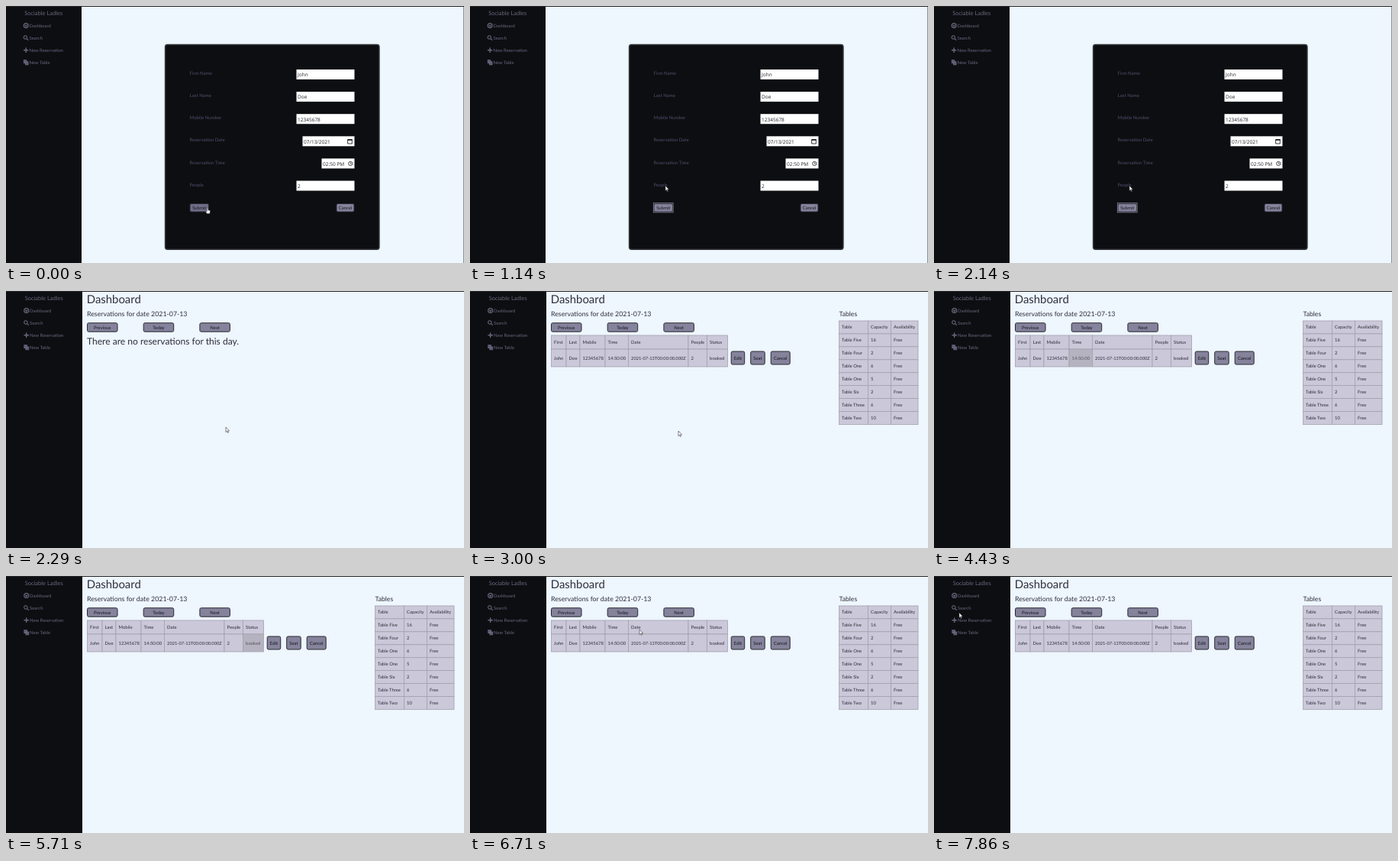
Recreate the animation shown at these times as an HTML page with a canvas. Size 600 by 336 pixels, loop 8000 ms.

```html
<!DOCTYPE html>
<html lang="en">
<head>
<meta charset="utf-8">
<title>Reservations</title>
<style>
  html, body { margin: 0; width: 100%; height: 100%; overflow: hidden; background: #eef6fe; }
  canvas { display: block; }
</style>
</head>
<body>
<canvas id="stage" width="600" height="336"></canvas>
<script>
const ctx = document.getElementById('stage').getContext('2d');
const LOOP = 8000, FORM_END = 2290, DATA_READY = 2430, FOCUS_AT = 1140;
const INK = '#2f2f3a', DARK = '#0d0e11', MUTED = '#68667f', LABEL = '#504e6b';
const BUTTON = '#85829c', BUTTON_HOVER = '#706d88';
const CELL = '#cbc8d9', CELL_HOVER = '#b5b3bf', LINE = '#a3a1ad';

// Pointer stops: time, x, y
const pointerStops = [
  [0, 264, 264], [140, 261, 252], [290, 258, 241], [430, 256, 235],
  [2290, 288, 178], [2570, 285, 180], [2710, 281, 181], [2860, 276, 183], [3000, 273, 183],
  [3290, 240, 132], [3430, 112, 55], [3570, 31, 39], [3710, 38, 42],
  [3860, 124, 47], [4000, 272, 47], [4140, 238, 47], [4290, 204, 47],
  [4430, 195, 87], [4860, 245, 88], [5140, 282, 88], [5290, 298, 88],
  [5710, 325, 88], [5860, 334, 88], [6000, 340, 88], [6140, 351, 87],
  [6430, 357, 88], [6570, 300, 82], [6710, 222, 70], [6860, 174, 55],
  [7570, 118, 54], [7710, 66, 52], [7860, 33, 48]
];
const links = ['Dashboard', 'Search', 'New Reservation', 'New Table'];
const fields = [
  ['First Name', 'John', 380.5], ['Last Name', 'Doe', 380.5],
  ['Mobile Number', '12345678', 380.5], ['Reservation Date', '07/13/2021', 388.5],
  ['Reservation Time', '02:50 PM', 413.5], ['People', '2', 380.5]
];
const bookingColumns = [106.5, 126, 144, 177, 207.5, 286, 310.5, 337.5];
const bookingHead = ['First', 'Last', 'Mobile', 'Time', 'Date', 'People', 'Status'];
const booking = ['John', 'Doe', '12345678', '14:50:00', '2021-07-13T00:00:00.000Z', '2', 'booked'];
const seatColumns = [483.5, 521.5, 551.5, 587];
const seats = [['Table', 'Capacity', 'Availability'],
  ...[['Five', 16], ['Four', 2], ['One', 6], ['One', 5], ['Six', 2], ['Three', 6], ['Two', 10]]
    .map(([name, size]) => ['Table ' + name, size, 'Free'])];

let pointer;

function text(str, x, y, size, color = INK, align = 'left', family = 'Lato') {
  ctx.font = `${size}px ${family}, sans-serif`;
  ctx.textAlign = align;
  ctx.fillStyle = color;
  ctx.fillText(str, x, y);
}

function rect(x, y, w, h, fill) {
  ctx.fillStyle = fill;
  ctx.fillRect(x, y, w, h);
}

function panel(x, y, w, h, radius, fill, stroke, lineWidth = 1) {
  ctx.beginPath();
  ctx.roundRect(x, y, w, h, radius);
  ctx.fillStyle = fill;
  ctx.fill();
  ctx.strokeStyle = stroke;
  ctx.lineWidth = lineWidth;
  ctx.stroke();
}

function path(d, stroke, lineWidth, fill) {
  const shape = new Path2D(d);
  if (fill) { ctx.fillStyle = fill; ctx.fill(shape); }
  ctx.strokeStyle = stroke;
  ctx.lineWidth = lineWidth;
  ctx.stroke(shape);
}

function at(x, y, draw) {
  ctx.save();
  ctx.translate(x, y);
  draw();
  ctx.restore();
}

function over(x, y, w, h) {
  const hit = pointer.x >= x && pointer.x < x + w && pointer.y >= y && pointer.y < y + h;
  return hit;
}

function button(label, x, y, w, h) {
  const hovered = over(x, y, w, h);
  if (hovered) pointer.shape = 'hand';
  panel(x + .5, y + .5, w - 1, h - 1, 1.8, hovered ? BUTTON_HOVER : BUTTON, '#292833');
  text(label, x + w / 2, y + h / 2 + 2.1, 5.95, '#17171f', 'center');
}

function cell(str, x, y, w, h, hoverable) {
  const hovered = hoverable && over(x, y, w, h);
  if (hovered) pointer.shape = 'none';
  rect(x, y, w, h, hovered ? CELL_HOVER : CELL);
  ctx.strokeStyle = LINE;
  ctx.lineWidth = .8;
  ctx.strokeRect(x, y, w, h);
  const size = String(str).length > 20 ? 5.72 : 5.9;
  text(str, x + 3.6, y + h / 2 + 2, size, hovered ? '#56555f' : INK);
}

function tableRow(values, columns, y, h, hoverable) {
  values.forEach((v, i) => cell(v, columns[i], y, columns[i + 1] - columns[i], h, hoverable));
}

function sidebar(width) {
  const shift = width - 100;
  rect(0, 0, width, 336, DARK);
  text('Sociable Ladles', 49.7 + shift / 2, 12, 7.5, MUTED, 'center');
  links.forEach((label, i) => {
    const y = 28 + i * 16.1;
    text(label, 31 + shift / 2, y, 5.95, MUTED);
    if (over(23, y - 7, 53, 10)) pointer.shape = 'hand';
  });
  const icons = [
    'M-3 0A3 3 0 1 1 3 0A3 3 0 1 1 -3 0M-1.5 -1L0 1.2L1.5 -1',
    'M-3 -.7A2.2 2.2 0 1 1 1.4 -.7A2.2 2.2 0 1 1 -3 -.7M.9 .9L3.2 3.2',
    'M-3.2 0H3.2M0 -3.2V3.2',
    'M-2.8 -3H.6V.5H-2.8ZM-.7 -.8H2.8V2.8H-.7Z'
  ];
  icons.forEach((d, i) => at(26.7 + shift / 2, 25.6 + i * 16.1,
    () => path(d, MUTED, i === 2 ? 1.5 : 1.1, i === 3 && '#55536b')));
}

function formPage(t) {
  sidebar(99);
  rect(599, 0, 1, 336, '#8b9096');
  panel(208.5, 50.5, 280.5, 267.7, 3, DARK, '#393a40', 1.4);
  fields.forEach(([label, value, x], i) => {
    const y = 83 + i * 29.1;
    text(label, 240.6, y + 7.1, 6.1, LABEL);
    rect(x, y, 456.5 - x, 13, '#fff');
    text(value, x + 1.6, y + 9.3, 6.5, '#24242a', 'left', '"Open Sans"');
  });
  at(450.5, 177, () => {
    path('M-2.8 -2.4H2.8V3H-2.8Z', '#222', .9);
    rect(-3, -3, 6, 1.8, '#222');
  });
  at(451.3, 206, () => path('M-2.7 0A2.7 2.7 0 1 1 2.7 0A2.7 2.7 0 1 1 -2.7 0M0 -1.7V.2H1.4', '#222', .8));
  button('Submit', 240.5, 258, 25.5, 11.5);
  button('Cancel', 432.5, 258, 24, 11.5);
  if (t >= FOCUS_AT) {
    ctx.strokeStyle = '#77758b';
    ctx.lineWidth = 1;
    ctx.strokeRect(240.4, 257.6, 25.7, 12.2);
  }
}

function dashboardPage(t) {
  sidebar(100);
  text('Dashboard', 105.8, 16.3, 14.9);
  text('Reservations for date 2021-07-13', 106, 32.5, 8.8);
  ['Previous', 'Today', 'Next'].forEach((label, i) => button(label, 106 + i * 73.7, 41.3, 40.5, 12.4));
  if (t < DATA_READY) {
    text('There are no reservations for this day.', 106, 70, 12.05);
    return;
  }
  tableRow(bookingHead, bookingColumns, 58, 18, false);
  tableRow(booking, bookingColumns, 76, 23, true);
  button('Edit', 341.7, 78.5, 18.5, 18);
  button('Seat', 367.2, 78.5, 19.5, 18);
  button('Cancel', 393.7, 78.5, 26, 18);
  text('Tables', 483.5, 32.5, 8.7);
  seats.forEach((row, i) => tableRow(row, seatColumns, 39 + i * 16.93, 16.93, false));
}

function drawPointer() {
  at(pointer.x, pointer.y, () => {
    ctx.lineJoin = 'round';
    if (pointer.shape === 'arrow') {
      path('M0 0V6.6L1.5 5.2L2.5 7.4L3.5 7L2.5 4.8H4.5Z', '#33333b', .6, '#fff');
    } else if (pointer.shape === 'hand') {
      path('M-.8 .5Q0 -.6 .7 .5V2.8L3 3.3Q3.7 3.6 3.5 4.6L2.8 7.4H-.8L-2.5 4.7Q-2.3 3.7 -.8 4.7Z',
        '#22222a', .5, '#fff');
    }
  });
}

function draw(t) {
  const [, x, y] = pointerStops.findLast(stop => stop[0] <= t);
  pointer = { x, y, shape: 'arrow' };
  ctx.textRendering = 'geometricPrecision';
  rect(0, 0, 600, 336, '#eef6fe');
  (t < FORM_END ? formPage : dashboardPage)(t);
  rect(0, 0, 600, 1, '#25262b');
  drawPointer();
}

function tick() {
  draw(performance.now() % LOOP);
  requestAnimationFrame(tick);
}
tick();
</script>
</body>
</html>
```
